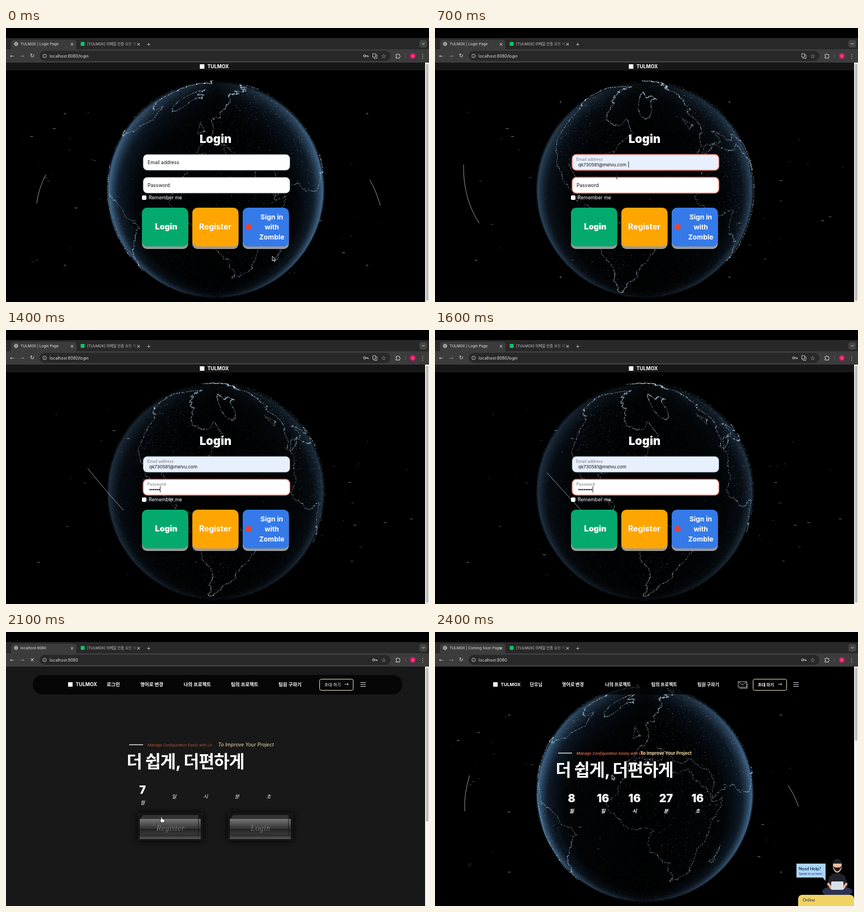
Animation, 756 px wide and 491 px high, one loop 2.51 s. Source, as an HTML page with a canvas:

```html
<!DOCTYPE html>
<html lang="ko">
<head>
<meta charset="utf-8">
<title>Login</title>
<style>
html, body { margin: 0; width: 100%; height: 100%; overflow: hidden; background: #000; }
canvas, svg { position: absolute; left: 0; top: 0; }
text { font-family: Inter, "Noto Sans CJK KR", sans-serif; fill: #fff; white-space: pre; }
.m { text-anchor: middle; }
.b { font-weight: 700; }
.h { font-weight: 900; }
.ln { fill: none; stroke: #ddd; }
.ui { font-size: 6.5px; fill: #e4e4e4; }
.icon { font-family: "DejaVu Sans", sans-serif; text-anchor: middle; fill: #ddd; }
.dark { fill: #111; }
.label { fill: #777; font-size: 7.2px; }
.it { font-style: italic; }
.chat { font-family: Lato, sans-serif; fill: #17304f; }
.script { font: italic 14px "Liberation Serif", serif; fill: #777; letter-spacing: .5px; text-anchor: middle; }
</style>
</head>
<body>
<canvas id="sky" width="756" height="491"></canvas>
<svg width="756" height="491">
  <defs>
    <linearGradient id="fade"><stop offset=".7" stop-color="#ccc"/><stop offset="1" stop-color="#ccc" stop-opacity="0"/></linearGradient>
    <linearGradient id="glass" x2="0" y2="1"><stop stop-color="#777"/><stop offset=".7" stop-color="#292929"/><stop offset="1" stop-color="#383838"/></linearGradient>
    <linearGradient id="base" x2="0" y2="1"><stop stop-color="#252525"/><stop offset="1" stop-color="#5a5a5a"/></linearGradient>
    <filter id="blur" x="-.3" y="-.6" width="1.6" height="2.2"><feGaussianBlur stdDeviation="6"/></filter>
    <g id="box">
      <rect x="-4" y="-4" width="117" height="50" fill="#0a0a0a" filter="url(#blur)"/>
      <path d="M0 8L6 0H106V8z" fill="#333"/>
      <rect y="7" width="109" height="28" fill="url(#glass)"/>
      <rect y="35" width="109" height="8" fill="url(#base)"/>
      <path d="M105 0v35M0 26h109" stroke="#171717"/>
    </g>
  </defs>

  <g id="login">
    <rect y="62" width="749" height="14" fill="#171717"/>
    <rect x="346.5" y="65" width="8" height="8" fill="#fff"/>
    <text x="360" y="72" class="b" font-size="8.8">TULMOX</text>
    <text x="374.5" y="206" class="m h" font-size="20.5">Login</text>
    <rect id="email" x="245" y="226.5" width="262.5" height="28.5" rx="7.5"/>
    <rect id="pass" x="245" y="267.5" width="262.5" height="28.5" rx="7.5"/>
    <text id="emailLabel">Email address</text>
    <text id="passLabel">Password</text>
    <text id="emailText" x="256" y="247.7" class="dark">qk730581@melvu.com</text>
    <g id="dots"></g>
    <path id="caret" stroke="#111" stroke-width=".9"/>
    <g id="hint">
      <rect x="295" y="262" width="101" height="19.5" rx="3" fill="#292a2d" stroke="#111" stroke-width="1.5"/>
      <text x="300.5" y="273.6" font-size="6.4">qk730581@melvu.com</text>
      <text x="385" y="274.5" class="icon" font-size="10">×</text>
    </g>
    <rect x="243" y="300" width="8" height="8" rx="2" fill="#fff"/>
    <text x="255" y="307.2" font-size="8.7">Remember me</text>
    <g id="buttons"></g>
    <circle cx="433.5" cy="356.5" r="5.5" fill="#ea4335"/>
  </g>

  <g id="home"></g>

  <g id="chat">
    <path d="M646 415h52v31l-5-6h-47z" fill="#a9d5f8"/>
    <text x="650" y="426.5" class="chat b" font-size="7.7">Need Help?</text>
    <text x="650.5" y="434.5" class="chat" font-size="5.5">Speak to us here!</text>
    <ellipse cx="719" cy="465" rx="27" ry="10" fill="#2b3354"/>
    <path d="M700 456l5-18q14-13 28 0l5 18z" fill="#20232b"/>
    <path d="M702 450l7 10M736 450l-7 10" stroke="#e8ab8b" stroke-width="4"/>
    <ellipse cx="719" cy="419" rx="8" ry="12" fill="#f2bd9e"/>
    <path d="M710 415q9-18 18 0zM711 419l4 3h8l4-3q-8 20-16 0" fill="#1c1c22"/>
    <rect x="708" y="447" width="22" height="15" rx="2" fill="#d9dee6"/>
    <rect x="649" y="471" width="100" height="30" rx="7" fill="#f1d264"/>
    <text x="657" y="483" class="chat" font-size="7.7">Online</text>
  </g>

  <g id="browser">
    <rect width="756" height="18"/>
    <rect y="18" width="756" height="20" fill="#282828"/>
    <rect x="9" y="21" width="117" height="30" rx="5" fill="#3c3c3c"/>
    <rect y="38" width="756" height="24" fill="#3c3c3c"/>
    <rect x="60" y="41" width="627" height="18" rx="9" fill="#282828"/>
    <g class="ln" stroke-width=".8"><circle cx="18" cy="28.5" r="3.2"/><ellipse cx="18" cy="28.5" rx="1.4" ry="3.2"/><path d="M15 28.5h6"/><circle cx="69" cy="50" r="3.2"/></g>
    <text id="tab" x="26" y="31" class="ui"></text>
    <rect x="133.5" y="25" width="7" height="7" rx="1" fill="#14c267"/>
    <text x="145" y="31" class="ui" style="fill:url(#fade)">[TULMOX] 이메일 인증 요청 메일</text>
    <rect x="739" y="21.5" width="13.5" height="13.5" rx="4" fill="#444"/>
    <path d="M743.5 27l2.3 2.3 2.3-2.3" class="ln"/>
    <g id="icons"></g>
    <text id="url" x="78" y="52.5" class="ui" style="font-size:7.2px"></text>
    <g id="key" class="ln"><circle cx="-2" r="2"/><path d="M0 0h4.5v2M2.5 0v1.5"/></g>
    <g id="lang" class="ln" stroke-width=".8"><rect x="655.5" y="46" width="5" height="6"/><path d="M660.5 48h2.5v6.5h-5l-1-2"/></g>
    <path d="M697 47.5h2q1-3 2.400 0h2v2q3 1 0 2.400v2h-6.400v-2q3-1 0-2.400z" class="ln"/>
    <path d="M714 46v8" stroke="#5a5a5a"/>
    <circle cx="727" cy="50" r="5.3" fill="#d5175e"/>
    <text x="727" y="51.8" class="m" font-size="4.5">단</text>
    <rect x="749" y="62" width="7" height="429" fill="#f5f5f5"/>
    <rect id="thumb" x="750.5" y="64" width="4.5" rx="2.2" fill="#bdbdbd"/>
  </g>

  <g id="pointer" stroke="#fff" stroke-width=".8">
    <path id="arrow" d="M0 0v8.5l2-1.8 1.4 3 1.5-.7-1.4-2.9h2.7z" fill="#111"/>
    <path id="beam" d="M-1.5-4h3M0-4v8M-1.5 4h3" stroke="#222"/>
    <path id="hand" d="M-1-3q1-1 1.7 0v3l4 1q1 1 0 4l-1 2h-4l-3.5-4q0-1.500 1.800-.5z" fill="#fff" stroke="#111"/>
  </g>
</svg>
<script>
const STEP = 100, LOOP = 2510, CX = 375, CY = 289, R = 195, RAD = Math.PI / 180, TILT = 20 * RAD;
const $ = id => document.getElementById(id);
const ctx = $("sky").getContext("2d");
let seed = 7;
const rand = () => (seed = seed * 16807 % 2147483647) / 2147483647;

// Rough coastlines as longitude, latitude pairs; roughen() adds the detail
const africa = [-6,35, 10,37, 20,31, 32,31, 43,12, 51,12, 40,-5, 32,-28, 20,-35, 9,0, -8,4, -17,14];
const eurasia = [-9,37, -1,44, 8,54, 5,60, 28,71, 105,77, 140,72, 108,18, 80,8, 55,17, 44,13, 36,36, 23,37, 13,45, 17,40];
const north = [-168,66, -95,68, -82,56, -65,60, -56,52, -81,31, -97,27, -88,21, -83,9, -106,23, -124,41, -155,58];
const south = [-79,9, -50,0, -35,-7, -48,-27, -68,-54, -70,-18];
const isles = [[-60,80, -44,60, -20,75], [-5,50, 1,52, -5,58], [44,-24, 50,-15, 48,-25]];
const lands = [africa, eurasia, north, south, ...isles]
  .map(list => list.flatMap((v, i) => i % 2 ? [] : [[v, list[i + 1]]]));

const dots = [];
const addDot = (lon, lat, a, size) => dots.push({ lon: lon * RAD, lat: lat * RAD, a, size });

function roughen(a, b) {
  const len = Math.hypot(a[0] - b[0], a[1] - b[1]);
  if (len < 1.3) return addDot(...a, .35 + rand() * .6, .8 + rand() * .7);
  const mid = a.map((v, i) => (v + b[i]) / 2 + (rand() - .5) * len * .4);
  roughen(a, mid);
  roughen(mid, b);
}
const inside = (poly, x, y) => poly.reduce((hit, [x1, y1], i) => {
  const [x2, y2] = poly[(i + 1) % poly.length];
  return (y1 > y) !== (y2 > y) && x < (x2 - x1) * (y - y1) / (y2 - y1) + x1 ? !hit : hit;
}, false);

lands.forEach(poly => poly.forEach((p, i) => roughen(p, poly[(i + 1) % poly.length])));
for (let i = 0; i < 9000; i++) {
  const lon = rand() * 360 - 180, lat = Math.asin(rand() * 2 - 1) / RAD;
  const land = lands.some(poly => inside(poly, lon, lat));
  addDot(lon, lat, land ? .12 + .6 * rand() ** 4 : .05 + .1 * rand(), .9);
}
const specks = Array.from({ length: 48 }, () => ({
  angle: rand() * 7, r: R * (1.1 + rand() * .75), y: (rand() - .5) * 300, w: rand() < .35 ? 5 : 1.3, a: .15 + rand() * .4
}));

// Interpolates rows of [step, ...values]
function tween(rows, s) {
  const i = Math.max(1, rows.findIndex(row => row[0] >= s));
  const a = rows[i - 1], b = rows[i], k = (s - a[0]) / (b[0] - a[0]);
  return a.slice(1).map((v, j) => v + (b[j + 1] - v) * k);
}
const pose = [[0, 10, 1], [2, 3, 1], [4, -33, .85], [7, -45, .65], [14, -62, .45], [21, -80, .5]];
const orbit = [
  [0, 71, 263, 58, 288, 55, 314],
  [4, 48, 248, 42, 292, 50, 332],
  [7, 51, 245, 50, 305, 79, 350],
  [14, 146, 248, 180, 290, 210, 323],
  [21, 335, 275, 380, 315, 415, 350]
];
const mouse = [[0, 476, 409], [2, 350, 250], [4, 325, 264], [17, 324, 272], [19, 279, 314], [22, 278, 345], [24, 316, 256]];

function drawGlobe(s) {
  const [lon, glow] = tween(pose, s), turn = lon * RAD;
  ctx.fillStyle = "#000";
  ctx.fillRect(0, 0, 756, 491);
  ctx.save();
  ctx.beginPath();
  ctx.arc(CX, CY, R, 0, 7);
  ctx.clip();
  const rim = ctx.createRadialGradient(CX, CY + 30, R * .72, CX, CY, R);
  rim.addColorStop(0, "#142b4020");
  rim.addColorStop(.6, `rgba(38,72,108,${.4 * glow})`);
  rim.addColorStop(.93, `rgba(95,150,200,${.7 * glow})`);
  rim.addColorStop(1, "#325a8200");
  ctx.fillStyle = rim;
  ctx.fillRect(0, 62, 756, 429);
  const shade = ctx.createLinearGradient(CX - R, 0, CX + R, 0);
  shade.addColorStop(0, "#0000");
  shade.addColorStop(.5, "#000d");
  shade.addColorStop(1, "#0000");
  ctx.fillStyle = shade;
  ctx.fillRect(0, 62, 756, 429);
  ctx.restore();

  ctx.fillStyle = "#c3def2";
  for (const d of dots) {
    const c = Math.cos(d.lat), h = Math.sin(d.lat), front = c * Math.cos(d.lon - turn);
    if (h * Math.sin(TILT) + front * Math.cos(TILT) < 0) continue;
    ctx.globalAlpha = d.a;
    ctx.fillRect(CX + R * c * Math.sin(d.lon - turn), CY - R * (h * Math.cos(TILT) - front * Math.sin(TILT)), d.size, d.size);
  }
  for (const p of specks) {
    const x = p.r * Math.sin(p.angle - turn);
    if (Math.cos(p.angle - turn) < 0 && Math.hypot(x, p.y) < R) continue;
    ctx.globalAlpha = p.a;
    ctx.fillRect(CX + x, CY + p.y, p.w, 1.2);
  }
  ctx.globalAlpha = .65;
  ctx.strokeStyle = "#dde8ee";
  const [x, y, ...curve] = tween(orbit, s);
  ctx.beginPath();
  ctx.moveTo(x, y);
  ctx.quadraticCurveTo(...curve);
  if (s < 7) {
    ctx.moveTo(650 - 12 * s, 272 + 1.8 * s);
    ctx.quadraticCurveTo(661 - 12 * s, 290, 669 - 12 * s, 318 - 3.2 * s);
  }
  ctx.stroke();
  ctx.globalAlpha = .3;
  if (s < 8) for (const sx of [-1, 1]) for (const sy of [-1, 1]) {
    const px = CX + sx * (270 - 17 * s), py = CY + sy * (136 + 3 * s);
    ctx.fillRect(px - 2, py, 5, 1);
    ctx.fillRect(px, py - 2, 1, 5);
  }
  ctx.globalAlpha = 1;
}

const label = (x, y, size, cls, str, extra = "") => `<text x="${x}" y="${y}" font-size="${size}" class="${cls}" ${extra}>${str}</text>`;

function button(x, color, lines, size, weight, shift) {
  const plate = (y, fill) => `<rect x="${x}" y="${y}" width="82.5" height="69.5" rx="9" fill="${fill}"/>`;
  return plate(326.5, "#999") + plate(322, color) + lines.map((line, i) =>
    label(x + 41 + shift, 361.2 + 18 * (i - (lines.length - 1) / 2), size, "m " + weight, line)).join("");
}
$("buttons").innerHTML = button(243, "#04aa6d", ["Login"], 14.3, "h", 2.5) +
  button(333, "#ffa500", ["Register"], 14.3, "b", 0) +
  button(423, "#357ae8", ["Sign in", "with", "Zomble"], 12.2, "b", 11);

function homePage(ready) {
  const dy = ready ? 15 : 0, dx = ready ? -7 : 0, bx = ready ? 8 : 0;
  const menu = [ready ? "단우님" : "로그인", "영어로 변경", "나의 프로젝트", "팀의 프로젝트", "팀원 구하기"];
  const menuX = ready ? [169.5, 227, 304, 386.5, 469] : [180, 240, 317.5, 402, 487];
  const counts = ready ? [8, 16, 16, 27, 16] : [7];
  const face = ready ? "h" : "b";
  const box = (x, word) => `<use href="#box" x="${x}" y="328"/>` + label(x + 55, 356, 14, "script", word);
  return `<rect x="48" y="77" width="660" height="35" rx="17" opacity=".75"/>
    <rect x="${111 + dx}" y="90" width="8" height="8" fill="#fff"/>` +
    label(124.5 + dx, 97, ready ? 8.2 : 8.8, "b", "TULMOX") +
    menu.map((word, i) => label(menuX[i], 97, ready ? 8.1 : 8.5, face, word)).join("") +
    `<rect x="${560.5 + bx}" y="84.5" width="60" height="20" rx="3" class="ln" style="stroke:#eee2c4"/>` +
    label(569 + bx, 97, 7.4, ready ? "h" : "", "초대 하기") +
    label(608.5 + bx, 97, 10, "icon", "→") +
    [90.5, 94, 97.5].map(y => `<path d="M${633.5 - dx} ${y}h9.5" class="ln"/>`).join("") +
    (ready ? '<path d="M542 89h15v10h-15zl7.5 6 7.5-6M544 101h14v-9" class="ln" stroke-width=".8"/>' : "") +
    `<path d="M220 ${202 + dy}h25" stroke="#fff" stroke-width="1.3"/>` +
    label(253, 204.7 + dy, 6.7, "it", "Manage Configuration Easily with Us", `style="fill:#dc6a4b;font-weight:${ready ? 600 : 300}"`) +
    label(ready ? 367 : 379, 204.7 + dy, ready ? 7.9 : 8.8, ready ? "b" : "it", "To Improve Your Project", 'style="fill:#f8dfa5"') +
    label(215.5, 242.5 + dy, 30.5, "b", "더 쉽게, 더편하게", 'letter-spacing="-1"') +
    [..."월일시분초"].map((unit, i) => {
      const x = 244 + 56.3 * i, counted = i < counts.length;
      return (counted ? label(x, 290 + dy, 19.5, "m h", counts[i]) : "") +
        label(x, (counted ? 308.5 : 297.5) + dy, 8.8, "m it " + (ready ? "h" : ""), unit);
    }).join("") +
    (ready ? "" : box(239, "Register") + box(400, "Login"));
}

const set = (id, attrs) => Object.entries(attrs).forEach(([k, v]) => $(id).setAttribute(k, v));
const show = (id, on) => $(id).style.display = on ? "" : "none";
const field = (id, focus, filled) => set(id, {
  fill: filled ? "#e8f0fe" : "#fff", stroke: focus ? "#d9695b" : "#50686c", "stroke-width": focus ? 1.4 : .7
});
const floatLabel = (id, y, up) => set(id, up
  ? { x: 252.5, y: y - 6, class: "label" }
  : { x: 253, y, class: "dark", "font-size": 8.6 });

function render(s) {
  const home = s >= 21, ready = s >= 23, loading = home && !ready, typed = Math.max(0, Math.min(8, s - 8));
  if (loading) {
    ctx.fillStyle = "#181818";
    ctx.fillRect(0, 0, 756, 491);
  } else drawGlobe(home ? (s - 22) * .8 : s);

  show("login", !home);
  show("home", home);
  if (home) $("home").innerHTML = homePage(ready);
  show("chat", s >= 24);
  $("tab").textContent = ready ? "TULMOX | Coming Soon Page" : loading ? "localhost:8080" : "TULMOX | Login Page";
  $("url").textContent = "localhost:8080" + (home ? "" : "/login");
  const icon = (x, y, size, str) => label(x, y, size, "icon", str);
  $("icons").innerHTML = icon(118, 31.5, 9, "×") + icon(237, 31.5, 9, "×") + icon(255, 31.5, 9, "+") +
    icon(11, 53, 9, "←") + `<g opacity=".5">${icon(29, 53, 9, "→")}</g>` + icon(47, 53.2, 10, loading ? "×" : "↻") +
    icon(69, 52, 5, "i") + icon(675, 53.5, 10.5, "☆") + icon(745, 53.5, 10, "⋮");
  set("key", { transform: `translate(${home ? 659 : 643} 50)` });
  show("key", s < 5 || s > 8);
  show("lang", !home);
  set("thumb", { height: ready ? 131 : home ? 276 : 425 });

  field("email", s >= 2 && s < 8, s >= 4);
  field("pass", s >= 7, false);
  floatLabel("emailLabel", 243.7, s >= 2);
  floatLabel("passLabel", 284.7, s >= 8);
  show("emailText", s >= 4);
  set("emailText", { "font-size": s === 4 ? 6.1 : 8 });
  show("hint", s === 3 || s === 4);
  $("dots").innerHTML = Array.from({ length: typed }, (_, i) => `<circle cx="${257.6 + 3.2 * i}" cy="286" r="1.2"/>`).join("");
  show("caret", s >= 5 && s < 17);
  set("caret", { d: s < 8 ? "M346 239v11" : `M${256.5 + 3.2 * typed} 280v11` });

  const beam = s === 2 || s === 3 || s === 6 || s === 7, hand = s >= 20 && s <= 22;
  show("pointer", s < 8 || s > 16);
  show("beam", beam);
  show("hand", hand);
  show("arrow", !beam && !hand);
  set("pointer", { transform: `translate(${tween(mouse, s)})` });
}

let last = -1;
const start = performance.now();
function tick() {
  const s = Math.min(24, Math.floor((performance.now() - start) % LOOP / STEP));
  if (s !== last) render(last = s);
  requestAnimationFrame(tick);
}
tick();
</script>
</body>
</html>
```
